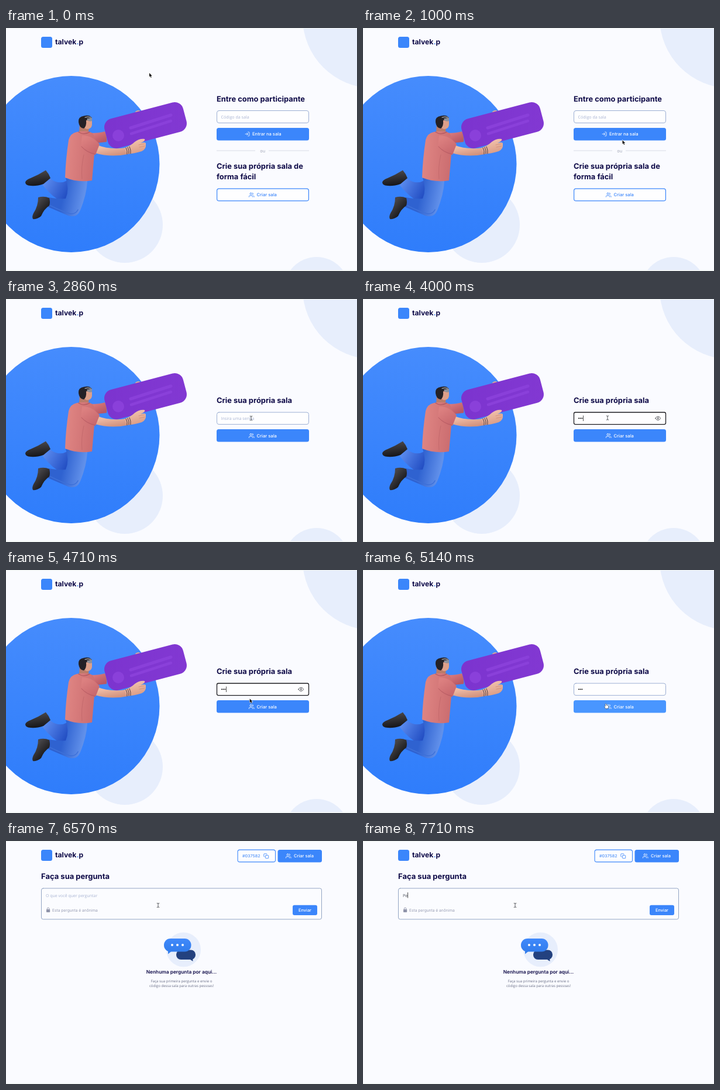
Write an HTML page with a canvas that moves like this. It is 600x416 px and loops after 8000 ms.

```html
<!DOCTYPE html>
<html lang="pt-BR">
<head>
<meta charset="utf-8">
<title>Salas de perguntas</title>
<style>
  html, body { margin: 0; width: 100%; height: 100%; overflow: hidden; background: #fafbff; }
  canvas { display: block; width: 600px; height: 416px; }
</style>
</head>
<body>
<canvas id="stage"></canvas>
<script>
const W = 600, H = 416, LOOP = 8000, STEP = 1000 / 7;
const canvas = document.getElementById('stage');
const ctx = canvas.getContext('2d');
const dpr = window.devicePixelRatio || 1;
canvas.width = W * dpr;
canvas.height = H * dpr;

const BG = '#fafbff', BLUE = '#3b86fb', HOVER = '#4996ff', PALE = '#e7eefc', NAVY = '#0f0b48';
const BORDER = '#9cafd3', HINT = '#a9b4d2', SKIN = '#e3ac94';
const HEAD = 'Inter, sans-serif', BODY = '"Open Sans", sans-serif';

const ICONS = {
  users: 'M17 21v-2a4 4 0 0 0-4-4H5a4 4 0 0 0-4 4v2M9 3a4 4 0 1 0 0 8a4 4 0 1 0 0-8M23 21v-2a4 4 0 0 0-3-3.87M16 3.13a4 4 0 0 1 0 7.75',
  enter: 'M15 3h4a2 2 0 0 1 2 2v14a2 2 0 0 1-2 2h-4M10 17l5-5-5-5M15 12H3',
  copy: 'M11 9h9a2 2 0 0 1 2 2v9a2 2 0 0 1-2 2h-9a2 2 0 0 1-2-2v-9a2 2 0 0 1 2-2zM5 15H4a2 2 0 0 1-2-2V4a2 2 0 0 1 2-2h9a2 2 0 0 1 2 2v1',
  eye: 'M1 12s4-8 11-8 11 8 11 8-4 8-11 8-11-8-11-8zM12 9a3 3 0 1 0 0 6a3 3 0 1 0 0-6'
};

// Steps at which the state changes, seven per second
const AT = { room: 15, focus: 22, blur: 35, ask: 37, askFocus: 40, type: 51 };

// Pointer keys: step, x, y
const POINTER = [
  [0, 245, 77], [3, 338, 92], [6, 432, 162], [8, 455, 222], [9, 454, 236],
  [12, 441, 272], [14, 437.5, 277], [17, 437.5, 277], [18, 431, 257],
  [19, 424, 229], [20, 419, 204], [22, 418, 203.5], [29, 418, 203.5],
  [31, 417, 214], [34, 416, 233], [36, 416, 233], [37, 331, 191.5],
  [38, 302, 157], [39, 274, 125], [40, 262, 112], [41, 260, 110]
];

function pointerAt(step) {
  const next = POINTER.findIndex(k => k[0] > step);
  if (next < 0) return POINTER[POINTER.length - 1].slice(1);
  const [s0, x0, y0] = POINTER[next - 1], [s1, x1, y1] = POINTER[next];
  const p = (step - s0) / (s1 - s0);
  return [x0 + (x1 - x0) * p, y0 + (y1 - y0) * p];
}

const inside = (x, y, l, t, r, b) => x >= l && x <= r && y >= t && y <= b;

function linear(x0, y0, x1, y1, from, to) {
  const g = ctx.createLinearGradient(x0, y0, x1, y1);
  g.addColorStop(0, from);
  g.addColorStop(1, to);
  return g;
}

function disc(x, y, r, fill) {
  ctx.beginPath();
  ctx.arc(x, y, r, 0, Math.PI * 2);
  ctx.fillStyle = fill;
  ctx.fill();
}

function box(x, y, w, h, r, fill, stroke, line = 1) {
  ctx.beginPath();
  ctx.roundRect(x, y, w, h, r);
  if (fill) { ctx.fillStyle = fill; ctx.fill(); }
  if (stroke) { ctx.strokeStyle = stroke; ctx.lineWidth = line; ctx.stroke(); }
}

function shape(d, fill) {
  ctx.fillStyle = fill;
  ctx.fill(new Path2D(d));
}

function curve(d, color, width) {
  ctx.strokeStyle = color;
  ctx.lineWidth = width;
  ctx.lineCap = ctx.lineJoin = 'round';
  ctx.stroke(new Path2D(d));
}

function text(str, x, y, size, color, weight = 400, family = HEAD, align = 'left') {
  ctx.font = `${weight} ${size}px ${family}`;
  ctx.textAlign = align;
  ctx.fillStyle = color;
  ctx.fillText(str, x, y);
}

function icon(name, x, y, size, color) {
  ctx.save();
  ctx.translate(x, y);
  ctx.scale(size / 24, size / 24);
  curve(ICONS[name], color, 2.1);
  ctx.restore();
}

function caret(x, y) {
  ctx.fillStyle = '#222';
  ctx.fillRect(x, y, 0.8, 9.5);
}

function brand() {
  box(60, 15, 19, 19, 3.5, BLUE);
  let x = 84;
  for (const [part, color] of [['talvek', NAVY], ['.', BLUE], ['p', NAVY]]) {
    text(part, x, 28, 12.2, color, 700);
    x += ctx.measureText(part).width;
  }
}

function figure() {
  // far leg and its boot
  shape('M62 268L76 258Q90 269 105 261L114 293L97 298Q79 290 62 268Z', linear(66, 262, 108, 285, '#5b8cf0', '#1f4ac0'));
  shape('M33 264Q34 260 42 257L55 251L68 243.5Q73 249 76 257L64 267Q50 272 38 269.5Q33 268 33 264Z', linear(55, 246, 58, 270, '#464447', '#141417'));
  // near leg and its boot
  shape('M102 257L139 262Q138 285 127 312Q121 326 106 321L71 306L73 290Q90 293 102 292Q109 276 102 257Z', linear(100, 275, 134, 282, '#2f62d0', '#6190ea'));
  curve('M76 304Q96 314 110 318Q119 319 123 311', '#3d70d8', 1.5);
  shape('M55 290Q65 287 74 291Q76 298 74 304Q65 310 60 322Q53 328 46 327Q44 323 47 317Q55 305 55 290Z', linear(52, 300, 70, 316, '#464447', '#141417'));

  // far arm and fingers
  shape('M145 180Q160 180 169 177Q173 186 172 195L154 197Z', linear(150, 178, 160, 197, '#dc7c7e', '#b95964'));
  shape('M220 147Q221 141 226 141Q231 141 232 146L226 152Z', SKIN);

  // head
  shape('M126 165L142 168L141 179Q134 184 125 179Z', '#b97c69');
  shape('M130 153Q145 150 147 160L147 166Q146 173 139 173Q131 173 130 153Z', '#dda08a');
  shape('M124 161Q123 152 133 150.5Q143 148 147 154L146 158L137 158Q138 168 133 172Q125 171 124 161Z', '#242126');
  shape('M138 155L147 153.5L147 159Q143 161 139 158Z', '#8e9099');
  curve('M135 153Q140 151 145 153', '#d8d9df', 1);

  // shirt
  shape('M121 178Q110 180 107 192Q102 225 101 256Q123 265 147 261L151 216Q155 190 148 180Q137 174 121 178Z', linear(103, 215, 152, 220, '#df8583', '#cb6d70'));
  curve('M124 178Q133 184 143 178', '#b75c63', 1.5);
  curve('M133 217Q128 238 130 258', '#c56a6d', 1);

  // card
  ctx.save();
  ctx.translate(238.5, 166.5);
  ctx.rotate(-0.258);
  box(-69.5, -26, 139, 52, 15, linear(-60, -20, 60, 20, '#7c34cf', '#8238d2'));
  ctx.restore();
  disc(192, 184, 10, '#8a40da');
  curve('M213 171L282 149', '#8a40da', 5);
  curve('M214 181L282 159', '#8a40da', 4.5);

  // near arm
  shape('M155 200Q178 209 204 205L208 216Q179 222 152 214Z', linear(175, 203, 178, 220, '#edbba5', '#d2917c'));
  shape('M203 205Q214 201 220 195Q228 189 237 190Q239 193 230 197Q240 194 239 199Q240 207 232 211Q220 215 206 216Z', linear(218, 193, 224, 216, '#f1c1ab', '#d99a83'));
  curve('M227 200L237 198M228 204L237 202', '#c98772', 0.7);
  curve('M205 205Q208 210 207 216M208 204Q211 210 210 215M211 203Q214 209 213 215', '#4d3d43', 1);
  shape('M130 184Q148 184 160 199L153 217Q136 214 128 203Z', linear(135, 188, 153, 215, '#dc8080', '#c7676c'));
  curve('M129 203Q138 213 152 216', '#b65b63', 1);
}

function scenery() {
  disc(203, 337, 65, PALE);
  disc(628, -18, 121, PALE);
  disc(531, 447.5, 55.5, PALE);
  disc(111.5, 233, 151, linear(120, 82, 100, 384, '#468cfd', '#2f7dfb'));
  figure();
  brand();
}

function createButton(y, hover) {
  box(360, y, 158, 21.5, 3.5, hover ? HOVER : BLUE);
  icon('users', 415, y + 6.2, 9.5, '#fff');
  text('Criar sala', 428.5, y + 13.5, 7.6, '#fff', 500);
}

function homePage() {
  text('Entre como participante', 360, 126, 12.9, NAVY, 700);
  box(360.5, 141.5, 157, 21, 3.5, '#fefeff', BORDER);
  text('Código da sala', 367.5, 154.7, 7.1, HINT, 400, BODY);
  box(360, 171, 158, 21.5, 3.5, BLUE);
  icon('enter', 408, 177, 9, '#fff');
  text('Entrar na sala', 421, 184.3, 7.6, '#fff', 500);
  ctx.fillStyle = '#d9dce6';
  ctx.fillRect(360, 209.5, 66, 1);
  ctx.fillRect(449, 209.5, 69, 1);
  text('ou', 438.7, 212.6, 7.3, '#a3a7b8', 400, HEAD, 'center');
  text('Crie sua própria sala de', 360, 241, 12.9, NAVY, 700);
  text('forma fácil', 360, 259, 12.9, NAVY, 700);
  box(360.6, 275.1, 156.8, 20.8, 3.5, '#fefeff', BLUE, 1.2);
  icon('users', 415, 281, 9.5, BLUE);
  text('Criar sala', 428.5, 288.2, 7.6, BLUE, 500);
}

function roomPage(step, hover) {
  const focused = step >= AT.focus && step < AT.blur;
  const dots = [25, 26, 28].filter(s => step >= s).length;
  text('Crie sua própria sala', 360, 178, 12.9, NAVY, 700);
  box(360.5, 194, 157, 20.6, focused ? 2.5 : 3.5, '#fefeff', focused ? '#1c1c20' : BORDER, focused ? 1.3 : 1);
  if (!dots) text('Insira uma senha', 367.5, 207, 7.1, HINT, 400, BODY);
  for (let i = 0; i < dots; i++) disc(369 + i * 2.7, 204.3, 1.05, '#222');
  if (focused) {
    caret(368 + dots * 2.7, 199.5);
    if (dots) icon('eye', 499.5, 199.5, 9.5, '#33343b');
  }
  createButton(223, hover);
}

function askPage(step) {
  const focused = step >= AT.askFocus;
  const typed = 'Per'.slice(0, [AT.type, 53, 54].filter(s => step >= s).length);
  brand();
  box(396.1, 15.1, 64.4, 20.8, 3.5, '#fdfdff', BLUE, 1.1);
  text('#037582', 404, 28.3, 7.1, '#4f92f8', 500);
  icon('copy', 440, 21, 9.5, BLUE);
  box(464.5, 15, 75.5, 21.5, 3.5, BLUE);
  icon('users', 478, 20.8, 9.5, '#fff');
  text('Criar sala', 492, 28.3, 7.5, '#fff', 500);

  text('Faça sua pergunta', 60, 65.2, 13, NAVY, 700);
  box(60.5, 81, 479, 53, 3, '#fbfcff', focused ? '#93a5c4' : BORDER);
  if (typed) text(typed, 68, 95.6, 7.1, '#50545f', 400, BODY);
  else text('O que você quer perguntar', 68, 95.6, 7, HINT, 400, BODY);
  if (focused && !(step >= 43 && step < 47)) caret(68 + (typed ? ctx.measureText(typed).width : 0), 88);
  box(69, 117, 6.2, 5, 0.8, '#8f94aa');
  curve('M70.3 117V116a1.8 1.8 0 0 1 3.6 0V117', '#8f94aa', 0.9);
  text('Esta pergunta é anônima', 79, 120.6, 6.65, '#969bb1');
  box(490, 109.7, 42, 17.3, 3, BLUE);
  text('Enviar', 511, 120.9, 7.4, '#fff', 500, HEAD, 'center');

  disc(303.5, 186, 29.5, PALE);
  box(291, 186.5, 33, 16.5, 8, '#23417f');
  shape('M312 201L319.5 206L319 199Z', '#23417f');
  shape('M277 185L277 193.5L285 187Z', '#327dec');
  box(270, 167, 46.5, 22.5, 11, linear(290, 167, 290, 190, '#4089fb', '#327dec'));
  for (const x of [284, 293, 302]) disc(x, 178, 2, '#fff');
  text('Nenhuma pergunta por aqui...', 300, 227, 8.35, NAVY, 600, HEAD, 'center');
  text('Faça sua primeira pergunta e envie o', 300, 241.8, 6.1, '#696e84', 400, BODY, 'center');
  text('código dessa sala para outras pessoas!', 300, 250, 6.1, '#696e84', 400, BODY, 'center');
}

function pointer(kind, x, y) {
  ctx.save();
  ctx.translate(x, y);
  if (kind === 'arrow') {
    const d = 'M0 0V6.6L1.5 5.3L2.6 8L3.7 7.5L2.6 5H4.7Z';
    curve(d, '#fff', 1);
    shape(d, '#111');
  } else if (kind === 'beam') {
    curve('M-1.8 -3.6Q0 -3.8 0 -2.6V2.6Q0 3.8 -1.8 3.6M1.8 -3.6Q0 -3.8 0 -2.6M0 2.6Q0 3.8 1.8 3.6', '#33363c', 0.8);
  } else {
    const d = 'M-1.5 -3.5Q-.7 -4.3 0 -3.5V-1.2Q2.8 -1.2 3.3 0V2L2.3 4H-1.2L-3.2 .8Q-3 -.2 -1.5 .7Z';
    curve(d, '#222', 1);
    shape(d, '#fff');
  }
  ctx.restore();
}

function draw(step) {
  const [x, y] = pointerAt(step);
  let kind = 'arrow';
  ctx.setTransform(dpr, 0, 0, dpr, 0, 0);
  ctx.textRendering = 'geometricPrecision';
  ctx.fillStyle = BG;
  ctx.fillRect(0, 0, W, H);
  if (step < AT.ask) {
    scenery();
    if (step < AT.room) homePage();
    else {
      const hover = inside(x, y, 360, 223, 518, 245);
      if (hover) kind = 'hand';
      else if (inside(x, y, 360, 194, 518, 215)) kind = 'beam';
      roomPage(step, hover);
    }
  } else {
    askPage(step);
    if (inside(x, y, 60, 81, 540, 134)) kind = 'beam';
  }
  ctx.fillStyle = '#f3f7f5';
  ctx.fillRect(0, 0, W, 1);
  ctx.fillRect(0, 414.5, W, 1.5);
  pointer(kind, x, y);
}

const start = performance.now();
function tick() {
  const t = (performance.now() - start) % LOOP;
  draw(Math.floor((t + 3) / STEP) % 56);
  requestAnimationFrame(tick);
}
tick();
</script>
</body>
</html>
```
